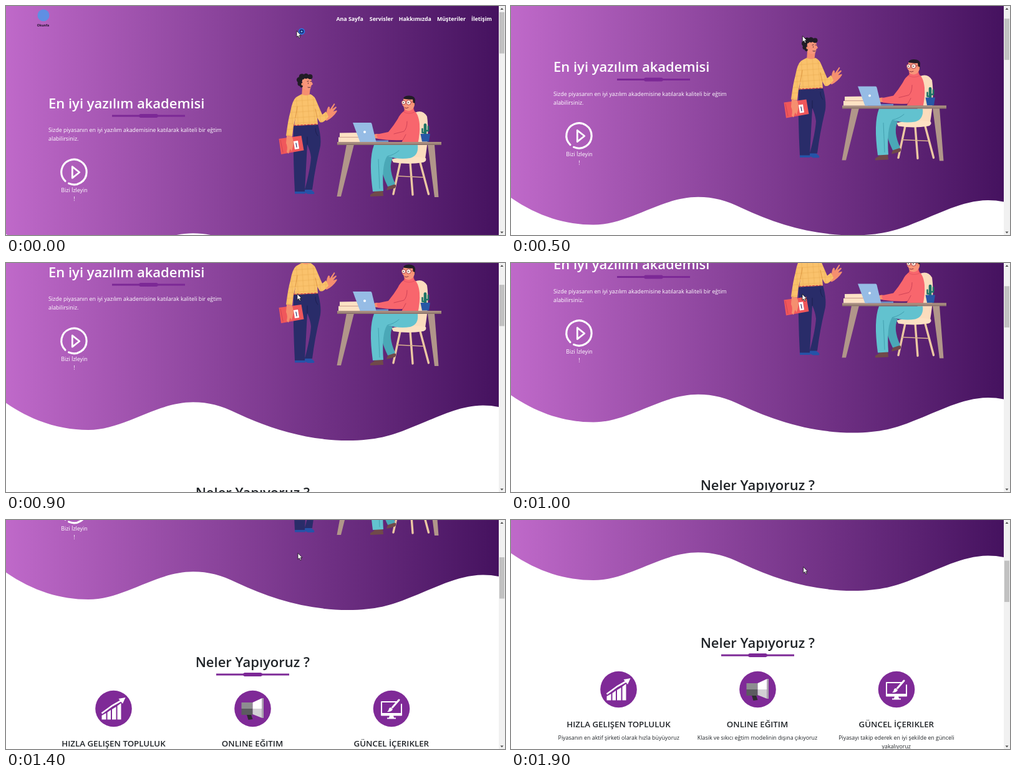
An HTML page that plays this animation: 800 by 369 pixels, repeating every 2000 ms.

```html
<!DOCTYPE html>
<html lang="tr">
<head>
<meta charset="utf-8">
<title>Yazılım akademisi</title>
<style>
  html, body { margin: 0; width: 100%; height: 100%; overflow: hidden; background: #fff; }
  svg { display: block; width: 100%; height: 100%; }
  text { font-family: "Open Sans", "Noto Sans", sans-serif; font-size: 8.85px; font-weight: 500; }
  .h { font-size: 22px; font-weight: 600; }
  .nav text { font-size: 8.8px; font-weight: 700; }
  .title { font-size: 13.3px; font-weight: 600; }
  .mid { text-anchor: middle; }
  .line { fill: none; stroke-linecap: round; stroke-linejoin: round; }
</style>
</head>
<body>
<svg viewBox="0 0 800 369" preserveAspectRatio="none">
  <defs>
    <linearGradient id="sky">
      <stop offset="0" stop-color="#bf69c9"/>
      <stop offset="1" stop-color="#45125f"/>
    </linearGradient>
    <pattern id="knit" width="9" height="9" patternUnits="userSpaceOnUse" patternTransform="rotate(-4)">
      <rect width="9" height="9" fill="#fac26c"/>
      <path d="M4 0V9M0 5H9" stroke="#eaa94f" stroke-width=".6"/>
    </pattern>
    <g id="rule" fill="#7c2896">
      <rect x="-58.5" y="-1.5" width="117" height="3"/>
      <path d="M-15-2L-13-3H13L15-2V2L13 3H-13L-15 2Z"/>
    </g>
    <circle id="disc" r="29.3" fill="#7f2a97"/>
  </defs>

  <rect width="800" height="369" fill="#fff"/>
  <g id="page">
    <path fill="url(#sky)" d="M0 0V367.5C44 398 88 411 132 411C190 411 240 366.3 300 366.3C325 366.3 345 372 370 384C425 410 485 428 548 428C592 428 619 420 645 409C695 390 738 363 790 374V0Z"/>

    <circle cx="60" cy="15" r="9.5" fill="#5f8fe3"/>
    <text class="mid" x="59.5" y="33" style="font-size:5.2px;font-weight:700" fill="#1d1029">Okunfa</text>

    <g class="nav" fill="#fff">
      <text x="529.5" y="23.7">Ana Sayfa</text>
      <text x="582.8" y="23.7">Servisler</text>
      <text x="629.8" y="23.7">Hakkımızda</text>
      <text x="691" y="23.7">Müşteriler</text>
      <text x="746" y="23.7">İletişim</text>
    </g>

    <g fill="#fff">
      <text class="h" x="68" y="164.7">En iyi yazılım akademisi</text>
      <text x="68" y="203">Sizde piyasanın en iyi yazılım akademisine katılarak kaliteli bir eğtim</text>
      <text x="68" y="217">alabilirsiniz.</text>
      <text class="mid" x="109.5" y="300">Bizi İzleyin</text>
      <text class="mid" x="109.5" y="314">!</text>
    </g>
    <use href="#rule" x="228.5" y="177"/>
    <g class="line" stroke="#fff" stroke-width="3.1" transform="translate(.6 0)">
      <path d="M94.4 282.1A20.2 20.2 0 1 1 100 285.9"/>
      <path d="M105.7 258.8V277.2L117.2 268Z" stroke-width="2.8"/>
    </g>

    <!-- standing man -->
    <g>
      <path fill="#f58f6f" d="M509 181L514 173Q514 166 517 162L519 163L519 167L526 157L527.5 158L523 166L529 162L530 163.5L524.5 170L530.5 168L530.5 170Q524 180 514 185Z"/>
      <path fill="#2553a8" d="M463 302.5V298Q470 293 478 297L480 302.5ZM475 297Q486 292 493 299Q496 302 493 303H484Q479 301 475 297Z"/>
      <path fill="#292c69" d="M461 191L500 190Q507 216 503 230Q495 264 491 296L479 296Q488 262 489 244Q488 234 483 223L479 299H463Q460 240 461 191Z"/>
      <path class="line" stroke="#1c1e4d" stroke-width=".9" d="M483 211V223M496 197Q496 205 500 209"/>
      <path fill="#f58f6f" d="M475 131L488 132L486 147H474Z"/>
      <path fill="url(#knit)" d="M474 142Q481 146 488 142Q495 145 498 154L507 175L513 170L517 178Q509 190 503 187L499 180L500 191L462 193L464 180Q460 195 459 210L449 209Q452 184 456 170Q459 152 465 147Q470 144 474 142Z"/>
      <path class="line" stroke="#d98f3b" stroke-width=".8" d="M464 180L467 162M496 166L499 180"/>
      <path stroke="#c9414d" stroke-width="1.5" stroke-dasharray="4 1.5" d="M461 192.5L500 190.5"/>
      <path fill="#f8957a" d="M475 118Q481 112 489 116L490 122L492 126L489.5 128Q489 135 484 136Q477 136 474 129Z"/>
      <g fill="#211c26">
        <circle cx="470.5" cy="119" r="4.6"/><circle cx="474.5" cy="114" r="4.8"/>
        <circle cx="481" cy="113" r="4.2"/><circle cx="487.5" cy="114" r="4"/>
        <circle cx="471.5" cy="125" r="4"/><circle cx="473.5" cy="129" r="2.4"/>
      </g>
      <circle cx="475.5" cy="126" r="2.2" fill="#f58f6f"/>
      <path class="line" stroke="#3a2030" stroke-width=".9" d="M483 121.5L485 121M488 121.3L489.5 121.6M484.5 124V125M484 131Q486 132 488 131"/>
      <path fill="#f0575b" d="M437.5 214L473.5 209L477.5 232.5L441 239Z"/>
      <path class="line" stroke="#c93f50" stroke-width=".8" d="M440 216L444 236"/>
      <path fill="#fff" d="M461 218L468 217L470 230L463 231Z"/>
      <path stroke="#292c69" stroke-width="1.2" d="M464.8 220.5L466.2 228"/>
      <path fill="#f58f6f" d="M450 209L458.5 210Q462 219 460 226L458 234L455.5 230L453 238L450 235Q452 227 449 221Z"/>
    </g>

    <!-- seated man and chair -->
    <g>
      <path class="line" stroke="#ecc8a3" stroke-width="3.4" d="M632 252L621 303M664 252L677.5 303M648 252L652 304"/>
      <path class="line" stroke="#d9b08e" stroke-width="1.5" d="M627 274L669 276"/>
      <path fill="#fbdcbd" d="M655 172Q668 166 675 178Q679 205 672 246L650 249Z"/>
      <path fill="#fde1c3" d="M618 247Q645 240 673 245Q675 250 669 252Q645 256 621 252Z"/>
      <path fill="#70494a" d="M584 307V304Q590 301 594 296L604 297L605 306ZM610 297Q611 291 617 287L625 288Q626 293 622 294Z"/>
      <path fill="#4aa8b7" d="M604 238L620 245Q612 260 624 287L612 291Q599 264 601 246Z"/>
      <path fill="#62c2cf" d="M590 224H660Q662 241 648 245Q630 248 611 242Q602 256 605 298L588 299Q581 247 590 224Z"/>
      <path class="line" stroke="#3c97a8" stroke-width=".8" d="M612 242Q622 240 630 233M597 247L599 294"/>
      <path fill="#f58f6f" d="M598 206.5Q591 205 588 209L590 213L601 214Z"/>
      <path fill="#f8666d" d="M640 168Q646 172 653 168Q661 172 663 190Q664 206 660 223H633L636 216Q616 217 596 214L594 207L613 203Q622 192 628 182Q632 173 640 168Z"/>
      <path class="line" stroke="#ca4055" stroke-width=".9" d="M643 186Q643 197 638 202L622 206M641 207Q638 213 636 216"/>
      <path fill="#f8666d" stroke="#d9495b" stroke-width=".6" d="M639 165Q646 168 653 164L655 171Q646 175 638 171Z"/>
      <path fill="#f8957a" d="M637 149H654L655 160Q653 168 646 169Q638 169 637.5 162L635 159L637 156Z"/>
      <path fill="#211c26" d="M637 149.5Q637.5 145 645 144.5Q655 144 656 151L655.5 160L653 157L652 150.5Q645 151 637 149.5Z"/>
      <circle cx="653.3" cy="158" r="2" fill="#f58f6f"/>
      <g fill="#fde6dd" stroke="#a2333d" stroke-width=".9">
        <circle cx="637.5" cy="155.5" r="3.3"/><circle cx="645.5" cy="155.5" r="3.8"/>
        <path d="M649.5 155L653 154.5" fill="none"/>
      </g>
      <circle cx="637" cy="155.6" r=".8" fill="#211c26"/><circle cx="645" cy="155.6" r=".8" fill="#211c26"/>
      <path class="line" stroke="#7d2b35" stroke-width=".9" d="M639 164Q642 165.5 645 163.8"/>
    </g>

    <!-- desk -->
    <g>
      <path fill="#b1968a" d="M546 223H558L537 307H530.5ZM676 223H687L693.5 308H687Z"/>
      <path fill="#8f766d" d="M531 219H698V224H531Z"/>
      <path fill="#a88d80" d="M531 219H698V222H531Z"/>
      <path fill="#fde2c4" d="M535 204.5L569 204L570 211H535ZM533 211.5H572V219H533Z"/>
      <path class="line" stroke="#e0b48f" stroke-width=".8" d="M535 211.3H571"/>
      <path fill="#6d93c9" d="M568 217L613 216.5V219H568Z"/>
      <path fill="#96bce5" d="M556 188H584.5Q586 188 586.5 190L593.5 219H567.5Z"/>
      <circle cx="575" cy="203" r="2" fill="#fff"/>
      <path class="line" stroke="#1d7468" stroke-width="4.6" d="M672 207V191.5"/>
      <path class="line" stroke="#1d7468" stroke-width="2.6" d="M672 204H667.5V198M672 201H677V194"/>
      <path fill="#2757a6" d="M664.5 206H680L678 218.5H667Z"/>
    </g>

    <!-- services -->
    <g class="mid" fill="#212529">
      <text class="h" x="395.3" y="520">Neler Yapıyoruz ?</text>
      <text class="title" x="172.5" y="647.6">HIZLA GELIŞEN TOPLULUK</text>
      <text class="title" x="395" y="647.6">ONLINE EĞITIM</text>
      <text class="title" x="617.8" y="647.6">GÜNCEL İÇERIKLER</text>
      <text x="172.7" y="668">Piyasanın en aktif şirketi olarak hızla büyüyoruz</text>
      <text x="395" y="668">Klasik ve sıkıcı eğtim modelinin dışına çıkıyoruz</text>
      <text x="617.8" y="668">Piyasayı takip ederek en iyi şekilde en günceli</text>
      <text x="617.8" y="682">yakalıyoruz</text>
    </g>
    <use href="#rule" x="395.5" y="532"/>
    <g transform="translate(172.5 587)">
      <use href="#disc"/>
      <path fill="#fff" d="M-19 11L-12 7V17.5H-19ZM-10 6L-4.5 2V17.5H-10ZM-2.5 1L4 -3V17.5H-2.5ZM6 -4.5L12 -9V17.5H6Z"/>
      <path fill="none" stroke="#fff" stroke-width="2.6" d="M-19 7.5L-2 -5L14 -14"/>
      <path fill="#fff" d="M8 -16L19 -18L14.5 -8Z"/>
    </g>
    <g transform="translate(395.5 587)">
      <use href="#disc"/>
      <path fill="#2d2a30" d="M-10 8H-3L0 17L-7 18Z"/>
      <path fill="#8d8d90" d="M-18 -10H0V0H-18Z"/>
      <path fill="#5c5b60" d="M-18 0H0V10H-18Z"/>
      <path fill="#fff" d="M0 -10L15 -17V0H0Z"/>
      <path fill="#d2d0d4" d="M0 0H15V15L0 9Z"/>
      <path fill="#aaa8ad" d="M15 -17H17.5V15H15Z"/>
    </g>
    <g transform="translate(618 587)">
      <use href="#disc"/>
      <path class="line" stroke="#fff" stroke-width="2" d="M8 -11H-16V10.5H16V-7"/>
      <path fill="#fff" d="M-16 7H16V11H-16ZM-3 11H3L4 14.5H7V16.5H-7V14.5H-4Z"/>
      <path class="line" stroke="#fff" stroke-width="3" d="M12 -14L1.5 -2"/>
      <path fill="#fff" d="M-1 -2L2 1Q0 5.5 -7 5Q-4 3 -4 0Q-3 -2 -1 -2Z"/>
    </g>
  </g>

  <g>
    <rect x="790" width="10" height="369" fill="#f1f1f1"/>
    <path fill="#505050" d="M792.5 6H797.5L795 3ZM792.5 363.5H797.5L795 366.5Z"/>
    <rect id="thumb" x="791" width="8" height="66.5" fill="#c1c1c1"/>
  </g>

  <g id="cursor">
    <g id="busy">
      <circle cx="8" cy="1" r="4.3" fill="#10246b" stroke="#2f6fd8" stroke-width="2"/>
      <circle cx="8" cy="1" r="1.6" fill="#6fb4f5"/>
    </g>
    <path fill="#fff" stroke="#111" stroke-width=".8" stroke-linejoin="round" d="M0 0V10L2.3 8L3.9 11.6L5.6 10.8L4 7.4H7Z"/>
  </g>
</svg>
<script>
  const LOOP = 2000, STEP = 100;
  // time, scroll, cursor x, cursor y
  const keys = [
    [0, 0, 466, 40],
    [500, 58.5, 467.3, 48],
    [700, 117, 466.7, 48.7],
    [1000, 154.5, 467, 50],
    [1200, 191.5, 467, 50.3],
    [1400, 283, 468, 53.3],
    [1900, 314, 468.7, 75.5]
  ];
  const get = id => document.getElementById(id);
  const page = get('page'), thumb = get('thumb'), cursor = get('cursor'), busy = get('busy');

  function pose(t) {
    const i = keys.findIndex(k => k[0] > t);
    if (i < 0) return keys[keys.length - 1];
    const a = keys[i - 1], b = keys[i], p = (t - a[0]) / (b[0] - a[0]);
    return a.map((v, n) => v + (b[n] - v) * p);
  }

  function draw(now) {
    const t = Math.floor(now % LOOP / STEP) * STEP;
    const [, scroll, x, y] = pose(t);
    page.setAttribute('transform', `translate(0 ${-scroll})`);
    thumb.setAttribute('y', 10 + scroll * 0.177);
    cursor.setAttribute('transform', `translate(${x} ${y})`);
    busy.setAttribute('visibility', t < 200 ? 'visible' : 'hidden');
  }

  const start = performance.now();
  function tick() {
    draw(performance.now() - start);
    requestAnimationFrame(tick);
  }
  tick();
</script>
</body>
</html>
```
